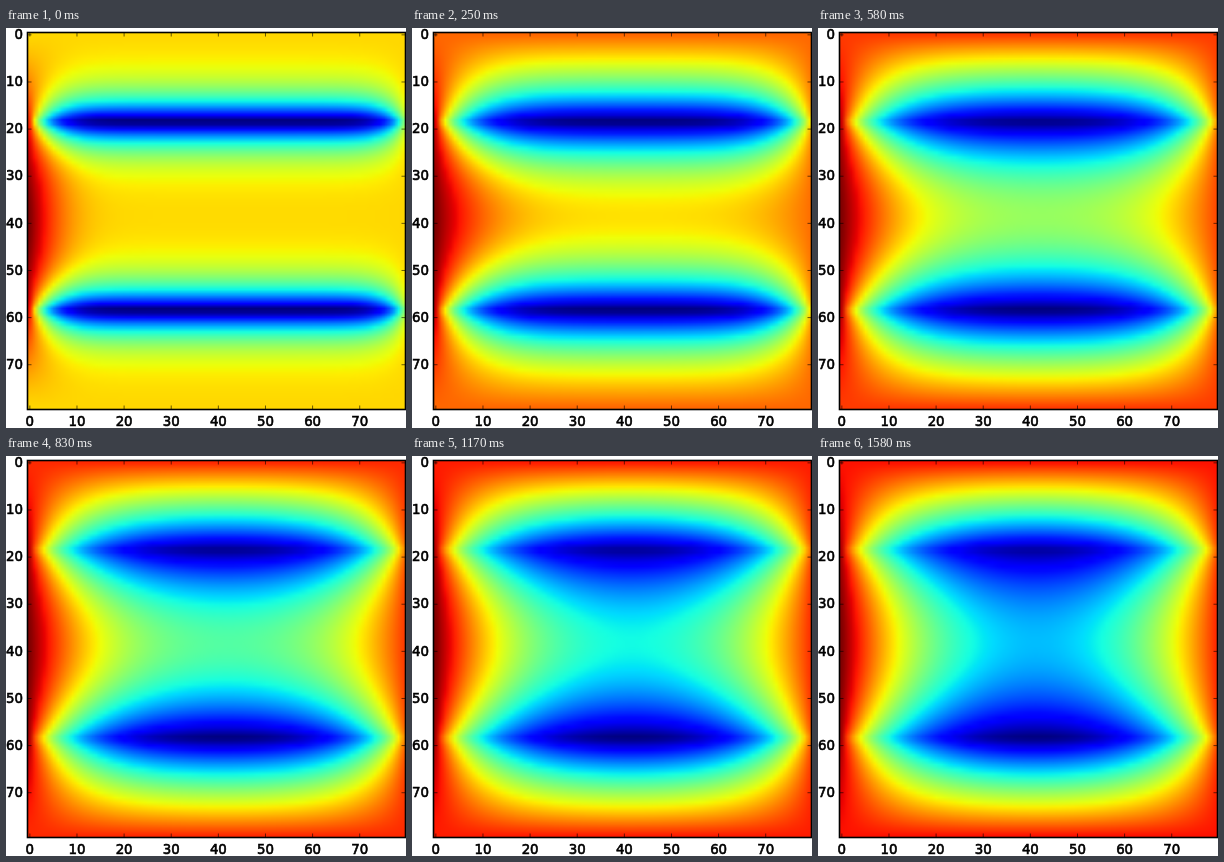
An HTML page with a canvas for the animation above (1660 ms loop, 400 by 400 pixels).

```html
<!DOCTYPE html>
<html>
<head>
<meta charset="utf-8">
<style>
  html, body { margin: 0; width: 100%; height: 100%; overflow: hidden; background: #fff; }
  canvas { display: block; }
</style>
</head>
<body>
<canvas id="stage" width="400" height="400"></canvas>
<script>
const N = 80, COLS = N + 1, FRAMES = 20, LOOP = 1660;
const FIRST_STEPS = 112, STEPS = 86;
const SOURCE = 0.77;
const LEFT = 21.5, TOP = 4.5, SIZE = 377, CELL = SIZE / N;
const ctx = document.getElementById('stage').getContext('2d');

// Diffusion with two cold lines, a warm left edge and zero on the other edges.
// The zero edge on the right lies one column outside the picture.
let field = new Float64Array(COLS * N), next = new Float64Array(COLS * N);
for (let y = 0; y < N; y++) {
  field[y * COLS] = next[y * COLS] = Math.max(0, Math.sin(Math.PI * y / (N - 1))) ** 1.4;
}

function coldness(y) {
  const row = y % 40;
  return row === 18 ? 0.6 : row === 19 ? 0.4 : 0;
}

function diffuse(steps) {
  while (steps--) {
    for (let y = 1; y < N - 1; y++) {
      const cold = SOURCE * coldness(y);
      for (let x = 1, i = y * COLS + 1; x < COLS - 1; x++, i++) {
        next[i] = (field[i - 1] + field[i + 1] + field[i - COLS] + field[i + COLS] - cold) / 4;
      }
    }
    [field, next] = [next, field];
  }
}

function ramp(v, a, b) {
  return Math.min(1, Math.max(0, (v - a) / (b - a)));
}

function jet(v) {
  return [
    ramp(v, 0.35, 0.66) - 0.5 * ramp(v, 0.89, 1),
    ramp(v, 0.125, 0.375) - ramp(v, 0.64, 0.91),
    0.5 + 0.5 * ramp(v, 0, 0.11) - ramp(v, 0.34, 0.65)
  ];
}

function heatmap() {
  const map = document.createElement('canvas');
  map.width = map.height = N;
  const mapCtx = map.getContext('2d'), image = mapCtx.createImageData(COLS, N);
  const low = Math.min(...field), high = Math.max(...field);
  field.forEach((value, i) => {
    const rgb = jet((value - low) / (high - low));
    image.data.set([...rgb.map(c => Math.round(c * 255)), 255], i * 4);
  });
  mapCtx.putImageData(image, 0, 0);
  return map;
}

const maps = [], starts = [];
for (let k = 0; k < FRAMES; k++) {
  diffuse(k ? STEPS : FIRST_STEPS);
  maps.push(heatmap());
  starts.push(Math.round(k * 25 / 3) * 10);
}

function line(x, y, dx, dy) {
  ctx.beginPath();
  ctx.moveTo(x, y);
  ctx.lineTo(x + dx, y + dy);
  ctx.stroke();
}

function label(text, x, y, align) {
  ctx.textAlign = align;
  ctx.fillText(text, x, y);
  ctx.lineWidth = 0.6;
  ctx.strokeText(text, x, y);
}

function drawAxes() {
  ctx.fillStyle = ctx.strokeStyle = '#000';
  ctx.font = '13.33px "DejaVu Sans", sans-serif';
  ctx.lineWidth = 1.6;
  ctx.strokeRect(LEFT, TOP, SIZE + 1, SIZE);
  for (let n = 0; n < N; n += 10) {
    const x = LEFT + (n + 0.5) * CELL, y = TOP + (n + 0.5) * CELL;
    ctx.lineWidth = 0.6;
    line(x, TOP, 0, 4);
    line(x, TOP + SIZE, 0, -4);
    line(LEFT, y, 4, 0);
    line(LEFT + SIZE + 1, y, -4, 0);
    label(n, x, 398, 'center');
    label(n, 17, y + 4.2, 'right');
  }
}

function draw(now) {
  const t = now % LOOP;
  const k = starts.filter(start => start <= t).length - 1;
  ctx.fillStyle = '#fff';
  ctx.fillRect(0, 0, 400, 400);
  ctx.drawImage(maps[k], LEFT, TOP, SIZE + 1, SIZE);
  drawAxes();
  requestAnimationFrame(draw);
}
draw(0);
</script>
</body>
</html>
```
